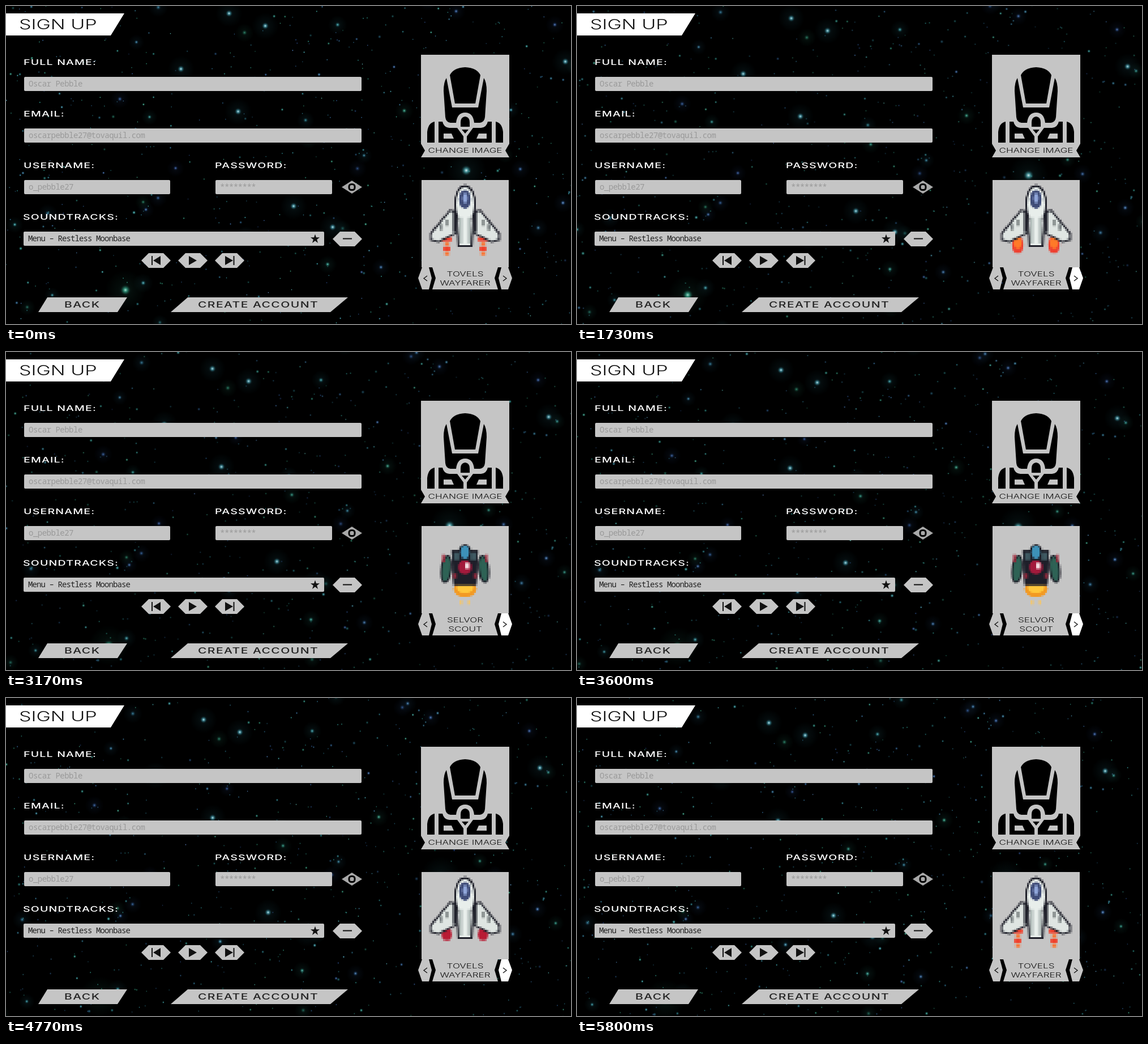
Animation, 998 px wide and 561 px high, one loop 8 s. Source, as an HTML page with a canvas:

```html
<!DOCTYPE html>
<html lang="en">
<head>
<meta charset="utf-8">
<title>Sign up</title>
<style>
  html, body { margin: 0; width: 100%; height: 100%; overflow: hidden; background: #000; }
  canvas, svg { position: absolute; left: 0; top: 0; }
  text { font-family: Inter, "DejaVu Sans", sans-serif; white-space: pre; }
  .title { font-size: 23.5px; font-weight: 300; fill: #111; }
  .label { font-size: 13.5px; font-weight: 500; letter-spacing: .8px; fill: #fff; }
  .button { font-size: 14.5px; font-weight: 500; letter-spacing: 1px; fill: #222; }
  .caption { font-size: 11.8px; font-weight: 300; fill: #111; text-anchor: middle; }
  .value { font: 500 14px "Noto Sans Mono", monospace; letter-spacing: -.5px; fill: #999; }
  .dark { fill: #222; letter-spacing: -.9px; }
  .panel { fill: #c5c5c5; }
  .line { fill: none; stroke: #111; stroke-width: 2; }
</style>
</head>
<body>
<canvas id="stage" width="998" height="561"></canvas>
<svg id="ui" width="998" height="561">
  <defs><path id="hex" d="M-26 0L-13-13H13L26 0L13 13H-13Z"/></defs>
  <path fill="#fff" d="M0 13H209L185 52H0Z"/>
  <g class="panel">
    <use href="#hex" x="603" y="411"/>
    <use href="#hex" x="265" y="449"/>
    <use href="#hex" x="330" y="449"/>
    <use href="#hex" x="395" y="449"/>
    <path d="M73 514H214L197 540H57Z"/>
    <path d="M321 514H604L573 540H291Z"/>
    <path d="M733 86H889V243L882 255L889 267H733L740 255L733 243Z"/>
    <path d="M753 461H869L863 480L869 500H753L759 480Z"/>
    <path id="arrow" d="M728 480L735 461H747L752 480L747 500H735Z"/>
    <use href="#arrow" id="next" transform="translate(1622) scale(-1 1)"/>
  </g>
  <path fill="#a9a9a9" d="M593 319.5L611 308L629 319.5L611 331Z"/>
  <rect x="606" y="314.5" width="10" height="10" rx="4" fill="none" stroke="#000" stroke-width="3"/>
  <path fill="#111" d="M273 441V457L260 449ZM323 441L337 449L323 457ZM387 441V457L401 449Z"/>
  <path class="line" d="M595 410.5H611M258 441V457M402.5 441V457"/>
  <path class="line" style="stroke-width:1.3" d="M744 476L738 480.5L744 485M878 476L884 480.5L878 485"/>
  <g id="half">
    <path d="M811 108Q790 109 784 122L793 172H811Z"/>
    <path d="M778 127L788 179H811V188Q797 188 795 206H785Q777 205 776 196L773 150Q773 134 778 127Z"/>
    <path d="M811 195Q803 196 803 205V213H811ZM805 218H811V225Z"/>
    <path d="M744 241V222Q746 206 757 204V241Z"/>
    <path fill-rule="evenodd" d="M764 204H771Q773 214 783 215H797L808 230V241H764ZM773 225V234H791L787 225Z"/>
  </g>
  <use href="#half" transform="translate(1622) scale(-1 1)"/>
</svg>
<script>
const $ = id => document.getElementById(id);
const LOOP = 8000, PIXEL = 3.2, MARGIN = 36;
const WIDE = 1.45; // one extended cut for the whole display face
const PANEL = '#c5c5c5', DARK = '#1e1f29';

function addNode(tag, attributes, content = '') {
  const node = document.createElementNS('http://www.w3.org/2000/svg', tag);
  for (const name in attributes) node.setAttribute(name, attributes[name]);
  node.textContent = content;
  return $('ui').appendChild(node);
}
const addText = (x, y, style, content, wide = WIDE) =>
  addNode('text', { class: style, transform: `translate(${x} ${y}) scale(${wide} 1)` }, content);

function addField(row, x, width, label, value, style = '') {
  const y = 125 + 91 * row;
  addText(x - 1, y - 21, 'label', label);
  addNode('rect', { class: 'panel', x, y, width, height: 25, rx: 2 });
  addText(x + 8, y + 17, 'value ' + style, value, 1);
}

addField(0, 32, 596, 'FULL NAME:', 'Oscar Pebble');
addField(1, 32, 596, 'EMAIL:', 'oscarpebble27@tovaquil.com');
addField(2, 32, 258, 'USERNAME:', 'o_pebble27');
addField(2, 370, 206, 'PASSWORD:', '********');
addField(3, 31, 531, 'SOUNDTRACKS:', 'Menu – Restless Moonbase', 'dark');
addText(23, 41, 'title', 'SIGN UP');
addText(103, 532, 'button', 'BACK');
addText(339, 532, 'button', 'CREATE ACCOUNT');
addText(811, 259, 'caption', 'CHANGE IMAGE');
const nameTop = addText(811, 477, 'caption');
const nameBottom = addText(811, 493, 'caption');

const starTips = Array.from({ length: 10 }, (_, i) => {
  const angle = i * Math.PI / 5, radius = i % 2 ? 3.3 : 8.5;
  return [546 + radius * Math.sin(angle), 411 - radius * Math.cos(angle)];
});
addNode('polygon', { points: starTips.join(' '), fill: '#111' });

const makeCanvas = (width, height) =>
  Object.assign(document.createElement('canvas'), { width, height });

// Star field, painted once and slid across the stage
const field = makeCanvas(1060, 561 + MARGIN);
(function paintStars() {
  const c = field.getContext('2d');
  let seed = 71;
  const random = () => (seed = seed * 16807 % 2147483647) / 2147483647;

  function glow(x, y, radius, hue, light, alpha) {
    const fade = c.createRadialGradient(x, y, 0, x, y, radius);
    fade.addColorStop(0, `hsl(${hue} 45% ${light}% / ${alpha})`);
    fade.addColorStop(.35, `hsl(${hue} 50% ${light * .6}% / ${alpha * .7})`);
    fade.addColorStop(1, `hsl(${hue} 60% 20% / 0)`);
    c.fillStyle = fade;
    c.fillRect(x - radius, y - radius, 2 * radius, 2 * radius);
  }
  function star(x, y, radius, hue, light) {
    if (radius > 3.5) glow(x, y, radius * 4, hue, 35, .22);
    glow(x, y, radius, hue, light, 1);
  }

  for (let i = 0; i < 750; i++)
    star(random() * field.width, random() * field.height, 1.4 + 3 * random() ** 5,
      160 + 60 * random(), 30 + 50 * random());
  const bright = [[394, 13], [458, 35], [309, 111], [410, 186], [508, 353], [988, 98], [577, 390]];
  for (const [x, y] of bright) star(x, y + MARGIN, 6, 190, 92);
  star(813, 290 + MARGIN, 9, 185, 95);
  star(211, 501 + MARGIN, 9, 165, 80);
})();

// Low resolution ship sprite; every part is mirrored around the middle
const sprite = makeCanvas(48, 48);
const pen = sprite.getContext('2d');

function paint(path, color, edge = 0) {
  for (const side of [1, -1]) {
    pen.setTransform(side / PIXEL, 0, 0, 1 / PIXEL, 24, 0);
    pen.strokeStyle = DARK;
    pen.lineWidth = edge;
    if (edge) pen.stroke(path);
    pen.fillStyle = color;
    pen.fill(path);
  }
}
function oval(x, y, rx, ry, tilt = 0) {
  const path = new Path2D();
  path.ellipse(x, y, rx, ry, tilt, 0, 7);
  return path;
}
// Upright bar whose half width runs from `upper` to `lower`
const taper = (x, top, bottom, upper, lower = upper) => new Path2D(
  `M${x - upper} ${top}H${x + upper}L${x + lower} ${bottom}H${x - lower}Z`);

function drawFighter(phase) {
  if (phase === 0) {
    for (let i = 0; i < 4; i++)
      paint(taper(32, 101 + 8.5 * i, 108 + 8.5 * i, i % 2 ? 4 : 9 - 1.5 * i), i % 2 ? '#f87838' : '#f0402c');
  } else if (phase === 2) {
    paint(oval(32, 110, 9, 11), '#b81c34');
  } else {
    paint(oval(32, 114, 10, 15), '#ee4030');
    paint(oval(32, 111, 7, 10), '#ff7a28');
  }
  paint(new Path2D('M14 58L26 55L59 95V104L47 107L14 91Z'), '#dfe5e2', 6);
  paint(taper(18, 54, 92, 3), DARK);
  for (const x of [32, 42]) paint(taper(x, 46 + x * .75, 57 + x * .75, 1.7), '#4a5254');
  paint(taper(0, 60, 115, 12, 10), '#e8eeeb', 6);
  paint(oval(0, 43, 16, 31), '#e8eeeb', 6);
  paint(taper(0, 62, 114, 11, 9), '#e8eeeb');
  paint(taper(7, 66, 112, 2), '#a8b4b2');
  paint(oval(0, 34, 10, 16), '#3f4c78');
  paint(oval(0, 32, 4, 9), '#8fa5d8');
}

function drawCrescent(phase) {
  for (let i = 0; i < 7; i++)
    paint(oval(5 + 4 * Math.sin(i * 1.2 + phase * Math.PI / 2), 100 + 7.5 * i, 4, 6), i % 2 ? '#52dcc0' : '#7eeed6');
  paint(oval(22, 62, 23, 34), '#b8352f', 6);
  paint(oval(10, 62, 24, 36), PANEL);
  for (const y of [52, 74]) paint(taper(20, y, y + 9, 14), DARK);
  paint(taper(24, 50, 82, 4), '#526a70', 4);
  paint(taper(13, 26, 50, 3, 5), DARK);
  paint(taper(0, 34, 96, 14, 18), DARK);
  paint(taper(11, 84, 98, 7, 4), '#684149');
  paint(oval(0, 47, 9, 17), '#5651a2');
  paint(oval(0, 73, 9, 10), '#d9f4ed');
  paint(taper(14, 62, 76, 2), '#45b7a9');
}

function drawBeetle(phase) {
  const drop = phase % 2 * 4;
  paint(oval(0, 111, 20, 14 + drop / 2), '#f29a24');
  paint(oval(0, 108, 14, 10), '#ffc73c');
  paint(taper(7, 131 + drop, 138, 2), '#f6c768');
  paint(oval(33, 76, 7, 22, -.12), '#2e6255', 6);
  paint(taper(38, 50, 64, 2), '#a32b3c');
  paint(oval(0, 50, 12, 17), DARK);
  paint(taper(0, 42, 104, 23, 20), DARK);
  paint(taper(15, 47, 60, 5), '#3e5861');
  paint(taper(18, 84, 92, 3), '#8d2639');
  paint(oval(0, 46, 7, 11), '#3d91b8');
  paint(oval(0, 73, 11, 12), '#a31a3c');
  pen.fillStyle = '#f2dbe0';
  pen.fillRect(-8, 65, 8, 10);
}

function drawManta(phase) {
  paint(taper(21, 90, 132 + phase % 2 * 5, 8), '#42dcb2');
  paint(taper(20, 94, 130, 3), '#86f2d4');
  for (let y = 98 + phase * 3; y < 134; y += 13) paint(taper(24, y, y + 5, 2), '#24b892');
  paint(oval(12, 45, 5, 11), PANEL, 9);
  paint(taper(11, 30, 42, 3), PANEL);
  paint(new Path2D('M0 58L20 64L52 68L40 83L10 96Z'), '#403d6e', 6);
  paint(taper(0, 58, 125, 13, 4), DARK);
  paint(taper(0, 76, 121, 6, 2), '#62505e');
  paint(oval(0, 65, 5, 8), '#56a5d8');
  paint(oval(20, 91, 5, 4), '#36bca4');
}

const fighter = ['TOVELS', 'WAYFARER', drawFighter];
const ships = [
  fighter,
  ["VRO'UN", 'SCOUT', drawCrescent],
  ['SELVOR', 'SCOUT', drawBeetle],
  ['OMBRILEX', 'SCOUT', drawManta],
  fighter,
];

const stage = $('stage').getContext('2d');

function render() {
  const time = performance.now() % LOOP;
  // Short stall near the start, still image at the end
  const clock = time < 500 ? Math.min(time, 130) : Math.min(time, 5800) - 140;
  const drift = clock * .00972;
  stage.fillStyle = '#000';
  stage.fillRect(0, 0, 998, 561);
  stage.imageSmoothingEnabled = true;
  stage.drawImage(field, -drift, drift * .56 - MARGIN);
  stage.fillStyle = PANEL;
  stage.fillRect(734, 307, 154, 154);

  const clicks = Math.max(0, Math.min(4, Math.floor((time - 1180) / 820)));
  const [top, bottom, drawShip] = ships[clicks];
  pen.setTransform(1, 0, 0, 1, 0, 0);
  pen.clearRect(0, 0, 48, 48);
  drawShip(Math.floor(clock / 100) % 4);
  stage.imageSmoothingEnabled = false;
  stage.drawImage(sprite, 734, 307, 48 * PIXEL, 48 * PIXEL);

  nameTop.textContent = top;
  nameBottom.textContent = bottom;
  $('next').style.fill = time > 1600 && time < 5300 ? '#fff' : '';
  requestAnimationFrame(render);
}
render();
</script>
</body>
</html>
```
